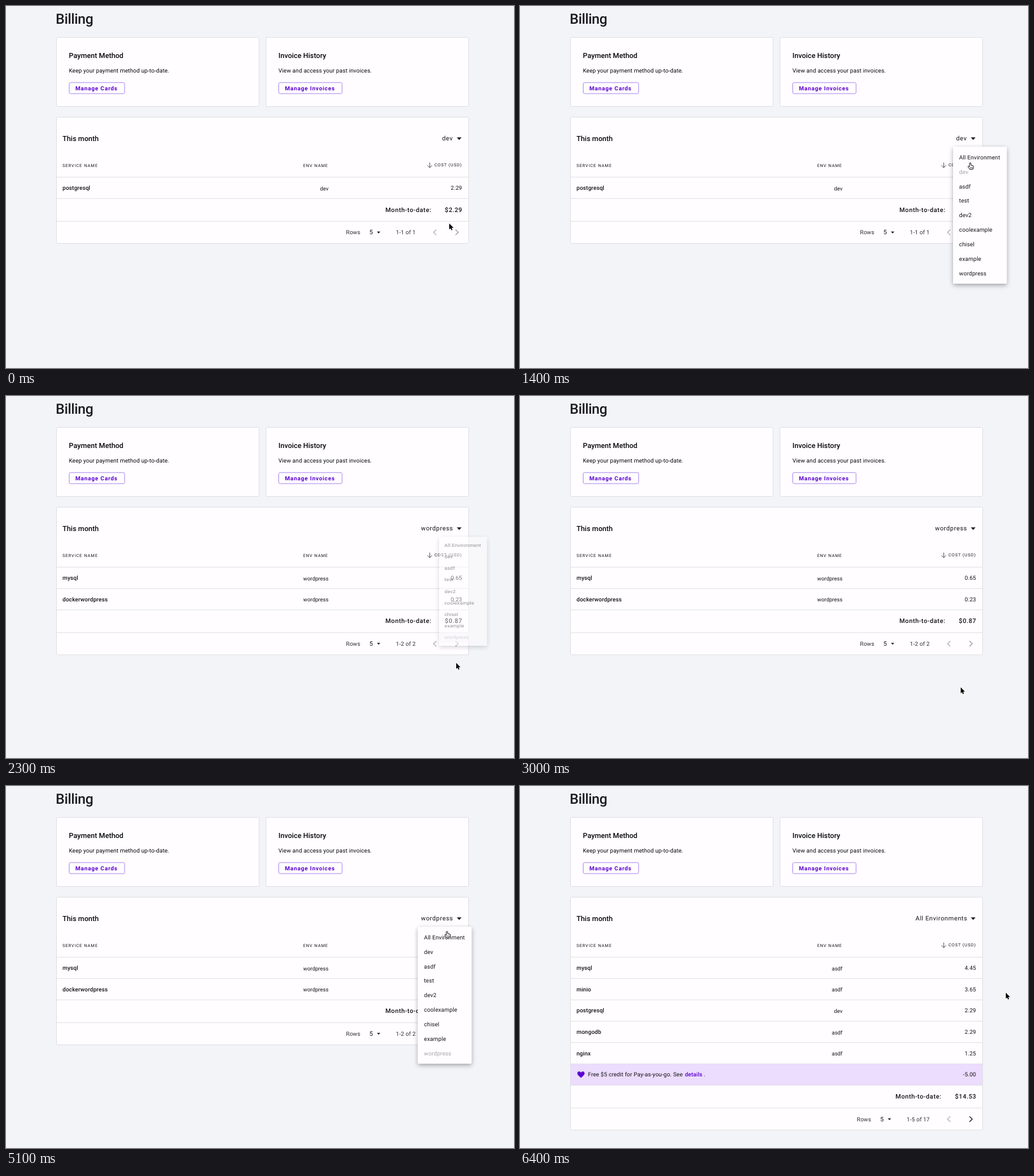
Animation, 800 px wide and 571 px high, one loop 7 s. Source, as an HTML page with a canvas:

```html
<!DOCTYPE html>
<html lang="en">
<head>
<meta charset="utf-8">
<title>Billing</title>
<style>
  html, body { margin: 0; width: 100%; height: 100%; overflow: hidden; background: #f2f4f7; }
  canvas { display: block; width: 800px; height: 571px; }
</style>
</head>
<body>
<canvas id="stage"></canvas>
<script>
const W = 800, H = 571, LOOP = 7000, STEP = 100;
const canvas = document.getElementById('stage');
const ctx = canvas.getContext('2d');
const dpr = window.devicePixelRatio || 1;
canvas.width = W * dpr;
canvas.height = H * dpr;

const INK = '#131216', BLACK = '#060608', PURPLE = '#5b00d0', LINE = '#e0e0e4', PAPER = '#fffdff';
const TOP = 270, ROW = 33.67, ITEM = 22.83, MENU_Y = 222, MENU_W = 84.5, MENU_H = 216;
const ITEMS = ['All Environment', 'dev', 'asdf', 'test', 'dev2', 'coolexample', 'chisel', 'example', 'wordpress'];

const VIEWS = {
  dev: {
    label: 'dev', labelX: 686.7, selected: 1, rows: [['postgresql', 'dev', '2.29']],
    total: '$2.29', totalX: 597.5, range: '1-1 of 1', pagerX: 535.5
  },
  wordpress: {
    label: 'wordpress', labelX: 653.5, selected: 8,
    rows: [['mysql', 'wordpress', '0.65'], ['dockerwordpress', 'wordpress', '0.23']],
    total: '$0.87', totalX: 597.5, range: '1-2 of 2', pagerX: 535.5
  },
  all: {
    label: 'All Environments', labelX: 622.7, selected: 0,
    rows: [['mysql', 'asdf', '4.45'], ['minio', 'asdf', '3.65'], ['postgresql', 'dev', '2.29'],
           ['mongodb', 'asdf', '2.29'], ['nginx', 'asdf', '1.25']],
    total: '$14.53', totalX: 591.3, range: '1-5 of 17', pagerX: 530.5, credit: true, next: true
  }
};

const MENUS = [
  { x: 682, open: 1000, close: 2200 },
  { x: 648.7, open: 4800, close: 5500 }
];

// Cursor moves: start, end, then four Bezier points
const MOVES = [
  [100, 800, [698, 343], [780, 300], [778, 205], [709, 205]],
  [1300, 1900, [709, 205], [709, 277], [709, 349], [709, 421]],
  [2400, 2700, [707, 421], [706, 434], [700, 448], [694, 459.5]],
  [3700, 4600, [694, 459.5], [788, 206], [775, 205], [695, 206.5]],
  [4900, 5300, [695, 206.5], [696, 220], [694, 234], [692.5, 245]],
  [5500, 6100, [692.5, 245], [715, 262], [748, 290], [765, 326]]
];

const clamp = v => Math.max(0, Math.min(1, v));
const smooth = v => { v = clamp(v); return v * v * (3 - 2 * v); };

function cursorAt(t) {
  let move = MOVES[0];
  for (const m of MOVES) if (t >= m[0]) move = m;
  const [start, end, a, b, c, d] = move;
  const u = 1 - Math.pow(1 - clamp((t - start) / (end - start)), 1.2), v = 1 - u;
  return [0, 1].map(i => v * v * v * a[i] + 3 * v * v * u * b[i] + 3 * v * u * u * c[i] + u * u * u * d[i]);
}

function viewAt(t) {
  return t < 2200 ? VIEWS.dev : t < 5500 ? VIEWS.wordpress : VIEWS.all;
}

function text(str, x, y, { size = 8.98, weight = 400, color = INK, gap = 0.1, align = 'left' } = {}) {
  ctx.font = `${weight} ${size}px Roboto, sans-serif`;
  ctx.letterSpacing = gap + 'px';
  ctx.textAlign = align;
  ctx.fillStyle = color;
  ctx.fillText(str, x, y);
}

function box(x, y, w, h, r, fill, stroke) {
  ctx.beginPath();
  ctx.roundRect(x, y, w, h, r);
  if (fill) { ctx.fillStyle = fill; ctx.fill(); }
  if (stroke) { ctx.strokeStyle = stroke; ctx.lineWidth = 1; ctx.stroke(); }
}

function path(points, closed) {
  ctx.beginPath();
  points.forEach(([x, y]) => ctx.lineTo(x, y));
  if (closed) ctx.closePath();
}

function stroke(points, color, width = 1) {
  path(points);
  ctx.strokeStyle = color;
  ctx.lineWidth = width;
  ctx.stroke();
}

function rule(y) {
  ctx.fillStyle = LINE;
  ctx.fillRect(80, y - 0.5, 648, 1);
}

function caret(x, y, w, h) {
  path([[x, y], [x + w, y], [x + w / 2, y + h]], true);
  ctx.fillStyle = INK;
  ctx.fill();
}

function chevron(x, y, dir, color) {
  stroke([[x - 2.2 * dir, y - 4.3], [x + 2.2 * dir, y], [x - 2.2 * dir, y + 4.3]], color, 1.3);
}

function heart(x, y) {
  ctx.beginPath();
  ctx.moveTo(x, y + 5);
  ctx.bezierCurveTo(x - 3.5, y + 2, x - 5.7, y + 0.5, x - 5.7, y - 2);
  ctx.bezierCurveTo(x - 5.7, y - 5.6, x - 1.5, y - 6, x, y - 3.2);
  ctx.bezierCurveTo(x + 1.5, y - 6, x + 5.7, y - 5.6, x + 5.7, y - 2);
  ctx.bezierCurveTo(x + 5.7, y + 0.5, x + 3.5, y + 2, x, y + 5);
  ctx.fillStyle = PURPLE;
  ctx.fill();
}

function infoCard(x, title, body, button, buttonW) {
  box(x + 0.5, 49.5, 319, 109, 2, PAPER, LINE);
  text(title, x + 20, 82, { size: 11.22, weight: 500, color: BLACK, gap: 0.02 });
  text(body, x + 20, 104.5, { color: BLACK });
  box(x + 20.5, 120.8, buttonW, 17.4, 2, null, '#ab8cf0');
  text(button, x + 30.3, 132.6, { weight: 700, color: PURPLE, gap: 0.69 });
}

function table(view) {
  const sumY = TOP + ROW * (view.rows.length + (view.credit ? 1 : 0));
  const pageY = sumY + 36, bottom = pageY + 35;
  box(79.5, 175.3, 649, bottom - 175.5, 2, PAPER, LINE);
  text('This month', 89, 212.5, { size: 11.22, weight: 500, color: BLACK, gap: 0.02 });
  text(view.label, view.labelX, 212, { size: 9.82, gap: 0.53 });
  caret(710, 207.2, 7.4, 4);

  const head = { size: 6.6, gap: 0.82 };
  text('SERVICE NAME', 89, 253.8, head);
  text('ENV NAME', 468, 253.8, head);
  text('COST (USD)', 674.7, 253.4, head);
  stroke([[667.3, 247], [667.3, 255]], '#55545a');
  stroke([[663.6, 251.4], [667.3, 255], [671, 251.4]], '#55545a');
  rule(TOP);

  view.rows.forEach(([name, env, cost], i) => {
    const y = TOP + ROW * i;
    text(name, 89, y + 20, { weight: 500 });
    text(env, 507.8, y + 20.5, { size: 8.5, gap: 0, align: 'right' });
    text(cost, 718.3, y + 20, { align: 'right', gap: 0.15 });
    rule(y + ROW);
  });

  if (view.credit) {
    const y = sumY - ROW;
    ctx.fillStyle = '#ecdcfd';
    ctx.fillRect(80, y, 648, ROW);
    rule(y);
    rule(sumY);
    heart(96, y + 17);
    text('Free $5 credit for Pay-as-you-go. See', 107, y + 20);
    text('details', 259.7, y + 20, { weight: 500, color: PURPLE });
    text('.', 289.3, y + 20);
    text('-5.00', 718.3, y + 20, { align: 'right', gap: 0.15 });
  }

  const sum = { size: 9.82, weight: 500, gap: 0.5 };
  text('Month-to-date:', view.totalX, sumY + 21, sum);
  text(view.total, 718.6, sumY + 21, { ...sum, align: 'right' });
  rule(pageY);

  const x = view.pagerX, mid = pageY + 17.4;
  text('Rows', x, mid + 3.1, { color: '#2c2b30' });
  text('5', x + 36.7, mid + 3.4, { size: 9.82 });
  caret(x + 48.7, mid - 1.2, 5.2, 2.8);
  text(view.range, x + 78.5, mid + 3.1, { color: '#2c2b30' });
  chevron(675.5, mid, -1, '#b3b2b7');
  chevron(710, mid, 1, view.next ? '#232227' : '#a09fa4');
}

function itemAt(y) {
  const i = Math.floor((y - MENU_Y - 5.6) / ITEM);
  return i >= 0 && i < ITEMS.length ? i : -1;
}

// Shadow only outside the panel, so a fading panel stays clean
function menuPanel() {
  ctx.save();
  ctx.beginPath();
  ctx.rect(-30, -30, MENU_W + 60, MENU_H + 60);
  ctx.rect(0, 0, MENU_W, MENU_H);
  ctx.clip('evenodd');
  ctx.shadowColor = 'rgba(0,0,0,0.34)';
  ctx.shadowBlur = 7 * dpr;
  ctx.shadowOffsetY = 2.5 * dpr;
  box(0, 0, MENU_W, MENU_H, 2, PAPER);
  ctx.restore();
  box(0, 0, MENU_W, MENU_H, 2, PAPER);
}

function menu(m, t, view) {
  const age = t - m.open, gone = t - m.close;
  const grow = smooth(age / 176) - smooth(gone / 220);
  const alpha = smooth(age / 260) - smooth(gone / 190);
  if (alpha <= 0) return;
  const s = 0.75 + 0.25 * grow;
  ctx.save();
  ctx.globalAlpha = clamp(alpha);
  ctx.translate(m.x, MENU_Y);
  ctx.scale(s, s * s);
  menuPanel();
  const hover = age > 300 ? itemAt(cursorAt(t - STEP)[1]) : -1;
  ITEMS.forEach((label, i) => {
    const y = 5.6 + ITEM * i, off = i === view.selected;
    if (i === hover) {
      ctx.fillStyle = off ? '#f6f4f8' : '#f1ecfb';
      ctx.fillRect(0, y, MENU_W, ITEM);
    }
    text(label, 9.6, y + 14.4, { gap: 0.12, color: off ? '#a6a5a9' : INK });
  });
  ctx.restore();
}

function arrow() {
  path([[0, 0], [0, 9.4], [2.1, 7.5], [3.5, 10.8], [5.1, 10.1], [3.8, 6.9], [6.7, 6.7]], true);
  ctx.lineWidth = 1.5;
  ctx.strokeStyle = '#fff';
  ctx.stroke();
  ctx.fillStyle = '#000';
  ctx.fill();
}

function hand() {
  path([[-1.1, 0.6], [0, -0.2], [1.1, 0.6], [1.1, 3.6], [4.6, 4.4], [5.3, 5.8], [4.8, 8.3], [4.1, 10.2],
        [-0.8, 10.2], [-1.7, 8.4], [-3.7, 6], [-2.9, 5], [-1.1, 6.2]], true);
  ctx.fillStyle = '#fff';
  ctx.fill();
  ctx.lineWidth = 0.9;
  ctx.strokeStyle = '#000';
  ctx.stroke();
  for (const x of [0.4, 1.9, 3.4]) stroke([[x, 6.6], [x, 8.8]], '#000', 0.6);
}

function cursor(t, view, active) {
  const [x, y] = cursorAt(t);
  const item = active ? itemAt(y) : -1;
  ctx.save();
  ctx.translate(x, y);
  ctx.lineJoin = 'round';
  if (item >= 0 && item !== view.selected) hand();
  else arrow();
  ctx.restore();
}

function draw(t) {
  const view = viewAt(t);
  const active = MENUS.find(m => t >= m.open && t < m.close + 200);
  ctx.setTransform(dpr, 0, 0, dpr, 0, 0);
  ctx.textRendering = 'geometricPrecision';
  ctx.fillStyle = '#f2f4f7';
  ctx.fillRect(0, 0, W, H);

  text('Billing', 78.3, 28.2, { size: 22.2, weight: 500, color: '#1c1b1f', gap: -0.4 });
  infoCard(79, 'Payment Method', 'Keep your payment method up-to-date.', 'Manage Cards', 87.3);
  infoCard(409, 'Invoice History', 'View and access your past invoices.', 'Manage Invoices', 99.7);
  table(view);

  if (active) {
    if (t < active.open + 200) box(active.x, 196.5, 724 - active.x, 25, 3, 'rgba(20,10,30,0.028)');
    menu(active, t, view);
  }
  cursor(t, view, active);
}

const begin = performance.now();
function tick() {
  const t = (performance.now() - begin) % LOOP;
  draw(Math.floor(t / STEP) * STEP);
  requestAnimationFrame(tick);
}
tick();
</script>
</body>
</html>
```
